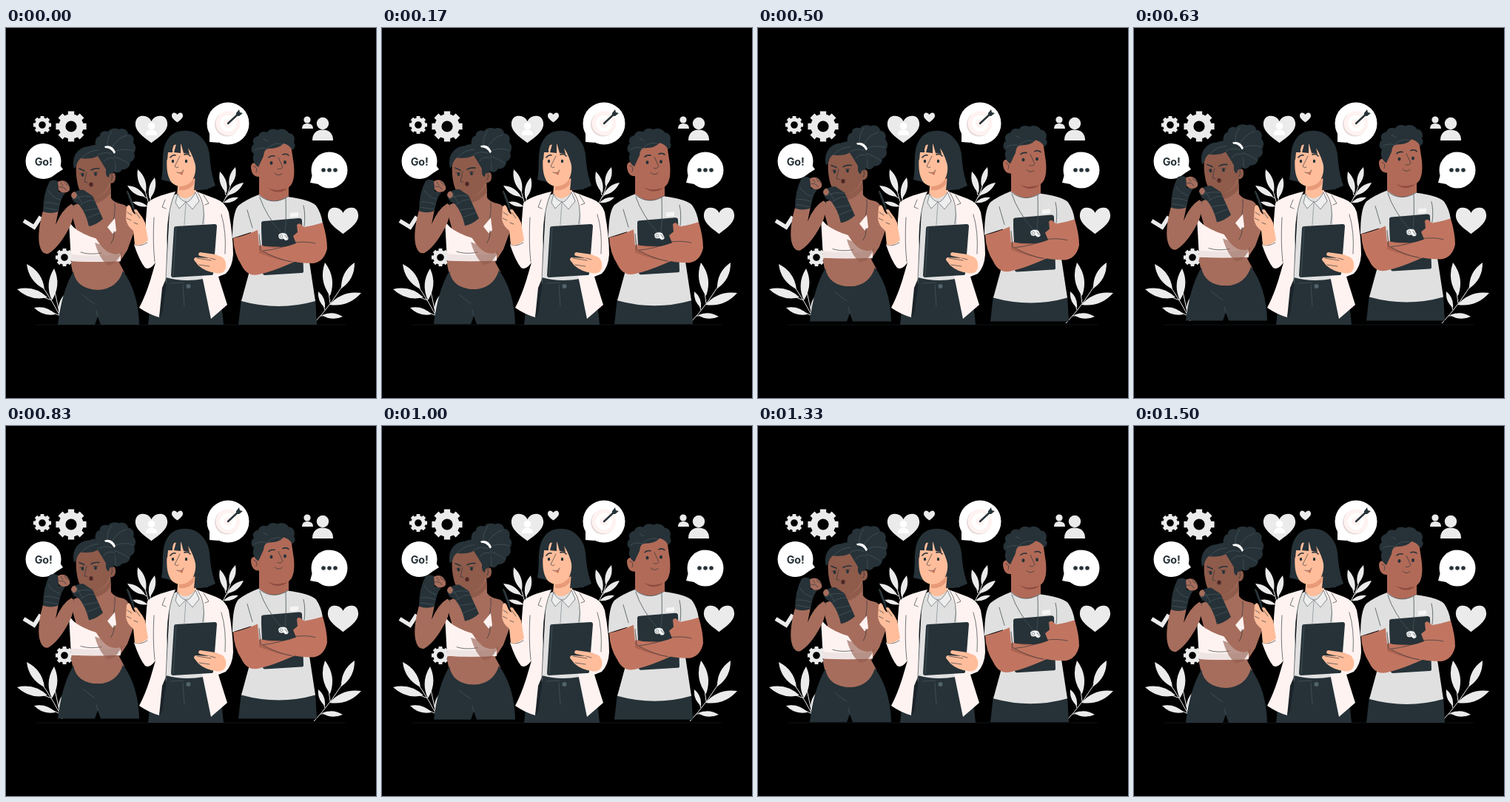
These frames come from a looping animation (500 by 500 pixels, 1540 ms). An HTML page:

```html
<!DOCTYPE html>
<html lang="en">
<head>
<meta charset="utf-8">
<title>Fitness team</title>
<style>
html,body{margin:0;width:100%;height:100%;overflow:hidden;background:#000}
svg{display:block;width:100vw;height:100vh}
.dark{fill:#263238}.pale{fill:#ebebeb}.grey{fill:#e0e0e0}.white{fill:#fff}.coat{fill:#fff3f1}
.tan{fill:#ffbd9b}.brown{fill:#a66d5c}.deep{fill:#8f5b4b}.clay{fill:#c17560}.rust{fill:#b16a57}
.line{fill:none;stroke:#263238;stroke-width:.65;stroke-linecap:round;stroke-linejoin:round}
.thick{stroke-width:1.6}.faint{stroke:#56666e;stroke-width:.5}.pen{stroke-width:2.4}
text{font:700 14.3px Inter,sans-serif;text-anchor:middle}
</style>
</head>
<body>
<svg viewBox="0 0 500 500">
<defs><path id="heart" d="M0 18C-6 13-21 4-21-7C-21-16-15-19-11-18Q-4-18 0-11Q4-18 11-18C15-19 21-16 21-7C21 4 6 13 0 18Z"/></defs>

<g id="gears" class="pale" fill-rule="evenodd"></g>
<path d="M24 260.500L38 269L47 255" fill="none" stroke="#ebebeb" stroke-width="5.500"/>
<g id="plants" class="pale"></g>
<g class="pale">
  <use href="#heart" transform="translate(196.500 137) scale(1.030 1.010)"/>
  <use href="#heart" transform="translate(231.500 121) scale(.36)"/>
  <use href="#heart" transform="translate(455.500 260.500) scale(.98)"/>
  <circle cx="428" cy="129" r="8.200"/><path d="M414 152Q414 138 428 137.500Q442 138 442 152Z"/>
  <circle cx="407" cy="124" r="4.600"/><path d="M400 136Q400 129 407 129Q415 129 415 136Z"/>
</g>
<g class="white"><circle cx="196.500" cy="132.500" r="4.800"/><path d="M188.500 145Q189 137.500 196.500 137.500Q204 137.500 204.500 145Z"/></g>

<g class="white">
  <circle cx="50.500" cy="180" r="24"/><path d="M72 184L77 191L66 198Z"/>
  <circle cx="300" cy="129" r="28.500"/><path d="M275 140L275 154L288 155Z"/>
  <circle cx="437" cy="192" r="24.500"/><path d="M414 198L411 209L422 211Z"/>
</g>
<text class="dark" x="50.800" y="185.500">Go!</text>
<circle cx="298.500" cy="130" r="16.500" fill="#e6d9d8"/><circle cx="300" cy="128.700" r="16.500" class="coat"/>
<circle cx="300" cy="129" r="11" class="white"/><circle cx="300" cy="129" r="6" class="coat"/>
<path class="line pen" d="M300 129L315 115"/>
<path class="dark" d="M311 115L315 110L316 114L320 115L315 119L311 119Z"/>
<g class="dark"><circle cx="429" cy="192" r="2.800"/><circle cx="437" cy="192" r="2.800"/><circle cx="445" cy="192" r="2.800"/></g>
<path class="line" opacity=".6" d="M41 401H459"/>

<g class="bob">
  <path class="dark" d="M122 164C119 155 121 147 127 146C126 140 134 138 138 140C141 135 149 135 152 137C158 134 165 138 165 143C172 144 174 150 172 155C177 160 175 166 173 169C176 176 171 180 168 181C168 189 161 192 157 191C153 198 146 196 143 191Z"/>
  <path class="line faint" d="M141 166Q148 149 163 145M142 169Q158 161 172 166M143 173Q158 177 166 184M146 176Q149 185 148 194M137 160Q136 148 143 140"/>
  <path class="brown" d="M119 215L141 203L142 230Q146 236 156 238Q164 239 167 249L175 270L164 300L153 317L160 330L154 354H95L88 320L94 270L86 242Q100 235 120 231Z"/>
  <path class="deep" d="M118 229Q132 229 141 212L142 222Q132 236 119 237Z"/>
  <path class="deep" d="M99 174Q118 161 136 173L141 197Q147 193 148 200Q149 210 140 210Q134 226 118 230Q105 230 100 220C95 210 94 193 95 184Z"/>
  <path class="dark" d="M92 190C88 172 98 161 112 160C126 154 144 160 146 175C149 186 146 195 144 197Q140 194 139 202Q134 201 135 191C131 184 127 178 124 173Q115 178 101 176Q96 180 95 187Z"/>
  <path class="line faint" d="M124 172Q132 166 143 170M102 176Q112 165 125 165M132 181Q136 174 145 176"/>
  <path class="white" d="M133 160Q144 157 148 168L146 170Q142 162 134 162Z"/>
  <path class="line thick" d="M99 190L106 193M115 192Q120 189 126 190"/>
  <g class="dark"><ellipse cx="103.500" cy="198.500" rx="1.900" ry="2.400"/><ellipse cx="121" cy="197.500" rx="1.900" ry="2.400"/></g>
  <path class="line" d="M109 195L106 208L110 209M100 197L105 196M118 195L124 195M143 198Q145 202 142 206"/>
  <ellipse cx="115" cy="211.500" rx="2.700" ry="3" fill="#4e2825"/>

  <path class="coat" d="M85 261Q89 268 96 273Q112 283 132 287L151 258L155 315Q119 317 88 315Z"/>
  <path d="M88 306Q119 309 155 306L155 315Q120 316 88 315Z" fill="#eee4e3"/>
  <path class="line" d="M92 235Q91 250 87 262M147 237Q148 252 144 264M101 303Q113 307 129 304"/>
  <path class="dark" d="M91 329Q95 353 125 354Q151 352 158 328Q179 357 180 401H128L124 390L120 401H70Q75 357 91 329Z"/>
  <path class="line faint" d="M104 361Q113 369 120 373M124 390L122 382"/>

  <path class="brown" d="M51 244C45 263 43 281 45 292Q48 307 57 305C70 298 83 277 89 262Q95 239 88 238Q76 245 67 266L71 246Z"/>
  <path class="dark" d="M59 207Q64 204 70 207L71 221L80 223Q74 229 71 248Q60 252 50 248Q50 224 59 207Z"/>
  <path class="brown" d="M70 208Q75 205 80 207Q87 211 86 219Q82 224 75 222L71 219Z"/>
  <path class="line" d="M74 209L77 213M79 208L82 212M83 210L85 214M72 215Q79 214 81 219"/>
  <path class="line faint" d="M53 236Q61 235 72 239M57 220Q62 229 73 232M52 243L70 246"/>

  <path class="deep" opacity=".6" d="M120 290Q126 312 138 321L147 318L158 303Z"/>
  <path class="brown" d="M112 265Q122 288 131 297Q141 308 153 305Q169 289 172 267Q168 240 154 238Q145 243 148 260L137 277L130 256Z"/>
  <path class="coat" d="M147 257L149 274L144 278L137 269Z"/>
  <path class="dark" d="M94 221Q104 216 108 221L117 227Q123 240 131 258Q122 266 112 268Q108 250 99 239Q89 235 88 227Z"/>
  <path class="brown" d="M93 221Q88 222 88 227L91 231Q96 230 96 225Z"/>
  <path class="line faint" d="M93 231Q104 225 116 228M101 239Q112 231 119 233M105 247Q116 245 124 244M109 257L127 250M95 224L103 237"/>
  <path class="line" d="M142 291Q147 283 146 275"/>
</g>

<g class="bob">
  <path class="dark" d="M318 366H418L420 401H314Z"/>
  <path class="rust" d="M342 199H382V230Q378 242 362 244Q347 239 342 227Z"/>
  <path d="M354 216Q370 224 382 212L379 218Q366 226 354 216Z" fill="#8d4b3f"/>
  <path class="grey" d="M342 225Q360 241 380 228Q411 232 419 240Q426 250 428 264L403 270L418 369Q369 383 318 369L330 325L331 276L306 284Q306 249 314 240Q324 232 342 225Z"/>
  <path class="line" d="M342 226Q360 241 381 228M402 240Q405 252 403 268M326 246L333 270"/>
  <path class="rust" d="M343 159Q365 146 384 151L389 185C391 207 386 218 373 218Q354 221 343 201Q332 202 331 188Q331 180 341 183Z"/>
  <path class="dark" d="M341 188Q331 181 335 170C329 166 332 158 335 157C331 150 338 146 341 146C343 139 350 140 353 141C357 134 365 137 367 138C374 134 381 139 382 142C390 142 391 151 389 155Q393 160 387 165Q382 157 375 156Q369 163 356 163Q349 162 348 173Z"/>
  <path class="line faint" d="M336 165Q344 160 354 164M353 162Q363 154 372 157M348 150L354 153"/>
  <path class="line thick" d="M355 175Q358 172 363 173M374 171Q379 169 382 172"/>
  <g class="dark"><ellipse cx="358.500" cy="182.500" rx="2" ry="2.400"/><ellipse cx="377" cy="181.500" rx="2" ry="2.400"/></g>
  <path class="line" d="M368 175L374 188Q371 192 367 190M363 196Q367 201 373 197M335 187Q341 188 338 195"/>

  <path class="dark" d="M348 261L396 257Q400 257 400 260L402 329Q402 331 399 331L350 334Q347 334 347 331L345 264Q345 261 348 261Z"/>
  <path d="M384 250L395 249L395 255L384 256Z" fill="#f5f5f5"/>
  <path class="clay" d="M307 284Q322 281 340 273L342 294L387 299L394 314Q361 329 342 333Q326 337 318 320Q308 305 307 284Z"/>
  <path d="M342 295L342 304Q368 315 389 316L397 312L381 296Z" fill="#ad6350"/>
  <path class="clay" d="M342 277L344 293Q364 302 392 291L388 281L394 276L393 266Q397 262 400 267L403 269Q416 267 428 263Q434 283 434 298Q430 316 415 318Q378 318 344 301Z"/>
  <path class="dark" d="M345 268L387 267L388 284Q385 290 379 291L346 288Z"/>
  <path class="line" d="M342 279L344 300Q367 313 386 316M348 301Q370 299 389 290Q406 288 418 291"/>
  <path class="line" d="M343 229Q351 253 372 277M378 230Q379 258 377 277"/>
  <path class="line faint" d="M358 260L372 277M378.500 258L377 277"/>
  <path d="M368 279Q373 275 379 278L382 284Q381 288 377 287L375 285Q369 287 368 282Z" fill="#f5f5f5" stroke="#263238" stroke-width=".6"/>
  <circle cx="372" cy="281.500" r="1.900" fill="none" stroke="#78848a" stroke-width=".8"/><path class="line" d="M377 280L380 284"/>
</g>

<g>
  <path class="dark" d="M213 333H287L294 401H192L195 374Z"/>
  <path class="line faint" d="M239 347L241 376M271 345L279 388M222 345L240 344"/><circle cx="246.500" cy="349" r="3" fill="#53636b"/>
  <path class="dark" d="M210 205C214 188 208 165 219 150C227 136 252 135 263 147C275 158 275 170 276 182Q278 200 283 213Q270 220 253 219L222 208Z"/>
  <path class="tan" d="M233 204H256L257 225Q253 238 243 240Q232 234 231 226Z"/>
  <path d="M234 213Q248 213 255 202L254 211Q246 221 234 219Z" fill="#e89a79"/>
  <path class="tan" d="M219 163Q234 151 248 162L256 183Q258 203 246 211Q234 218 224 209C215 197 217 179 219 163Z"/>
  <path class="dark" d="M216 178Q216 149 239 147Q262 147 268 176L273 218L254 219L257 190Q254 174 246 162L248 170L240 169L236 155L236 169L227 168L231 153Q224 160 225 168L219 168L218 178Z"/>
  <path class="line thick" d="M222 175Q225 171 229 172M241 171Q246 169 249 173"/>
  <g class="dark"><ellipse cx="225.500" cy="180" rx="1.700" ry="2.200"/><ellipse cx="243.500" cy="180" rx="1.700" ry="2.200"/></g>
  <path class="line" d="M235 173L228 187Q230 190 233 188M231 195Q237 198 240 192"/><path d="M234 196Q238 196 240 193L238 199Z" fill="#c76f5c"/>

  <path class="grey" d="M222 228L231 224Q243 237 256 222L272 230L276 260L267 339Q240 344 216 337Z"/>
  <path class="coat" d="M229 221Q198 228 191 237Q189 255 188 279L173 293Q181 316 188 324Q194 328 202 317L195 341Q188 363 180 378Q193 387 207 391L217 341L218 294Q216 254 229 221Z"/>
  <path d="M217 337L216 351L211 386L207 391L211 351Z" fill="#1b2429"/>
  <path class="coat" d="M255 220L284 231Q297 236 301 249Q307 282 307 306Q306 323 297 332L287 336L299 374L277 393L265 335L269 266Q270 242 255 220Z"/>
  <path class="line" d="M229 222Q217 245 218 296L216 340M259 222Q271 239 266 265M215 232L211 242L216 244M267 226L274 237L269 239M200 256Q198 289 201 316M291 252Q298 275 296 305M174 293Q182 296 191 290"/>
  <path d="M232 224L229 236L234 244L243 235L252 245L261 234L256 222Q248 237 243 235Q235 233 232 224Z" fill="#eee" stroke="#263238" stroke-width=".5"/>
  <path class="line faint" d="M243 237L241 266"/>

  <path class="dark" d="M230 268L282 265Q285 265 285 268L280 332Q280 334 277 334L226 337Q223 337 223 334L227 271Q227 268 230 268Z"/>
  <path class="line faint" d="M230 269L226 335"/>
  <path class="tan" d="M262 303Q258 306 262 308L276 311L256 310Q252 312 256 316L260 321Q269 329 283 331Q292 333 296 327Q300 318 293 310L283 306Z"/>
  <path class="line" d="M258 311L277 314M261 320L275 322M276 311L283 313"/>
  <path class="line pen" d="M164 221L174 248"/><path class="line faint" d="M166 223L172 239"/>
  <path class="tan" d="M169 243Q166 236 163 242L162 258Q163 267 172 274L174 293Q182 296 192 287L188 263Q185 256 179 249Q176 243 173 246L175 252Q171 250 169 243Z"/>
  <path class="line" d="M164 249L170 253M175 249L181 257M163 257L169 260M178 265L173 263"/>
</g>
</svg>
<script>
const leaf = (x, y, tx, ty) => {
  const mx = (x + tx) / 2, my = (y + ty) / 2, dx = (ty - y) * .27, dy = (x - tx) * .27;
  return `M${x} ${y}Q${mx + dx} ${my + dy} ${tx} ${ty}Q${mx - dx} ${my - dy} ${x} ${y}Z`;
};
const plant = (stem, leaves) =>
  `<path d="${stem}" fill="none" stroke="#ebebeb"/><path d="${leaves.map(l => leaf(...l)).join('')}"/>`;
plants.innerHTML =
  plant('M76 396Q66 373 44 342M73 389Q65 384 54 382M73 389L64 347M62 368L40 360', [
    [52,353,28,319], [56,364,15,353], [62,368,65,325], [67,387,38,378], [72,387,79,360]]) +
  plant('M416 399Q441 373 463 334M438 372L434 342M431 381L426 366M425 389L446 388', [
    [438,362,431,317], [453,352,471,317], [437,374,480,358], [431,378,422,356], [427,388,455,390]]) +
  plant('M193 252Q196 238 183 208M194 240L197 217M190 230L174 219M193 242L181 236', [
    [189,222,178,191], [194,231,201,202], [188,228,164,213], [191,241,171,235]]) +
  plant('M288 244Q302 225 306 202M297 226L293 206M296 230L312 216', [
    [302,214,310,188], [298,223,289,194], [299,226,321,209], [294,236,314,229]]);

const gear = (x, y, r, hole) => {
  const point = (a, k) => `${x + r * k * Math.cos(a)} ${y + r * k * Math.sin(a)}`;
  let d = '';
  for (let i = 0; i < 8; i++)
    [[-.25, .8], [-.2, 1], [.2, 1], [.25, .8]].forEach(([a, k]) =>
      d += (d ? 'L' : 'M') + point(a + i * Math.PI / 4, k));
  return `<path d="${d}ZM${x - hole} ${y}a${hole} ${hole} 0 1 0 ${2 * hole} 0a${hole} ${hole} 0 1 0 ${-2 * hole} 0Z"/>`;
};
gears.innerHTML = gear(88, 133, 21, 7.600) + gear(49, 131, 12.300, 4.800) + gear(79, 310, 12.300, 4.800);

const movers = document.querySelectorAll('.bob');
const draw = now => {
  const y = -2.850 * (1 - Math.cos((now + 25) / 1540 * 2 * Math.PI));
  movers.forEach(g => g.setAttribute('transform', `translate(0 ${y})`));
  requestAnimationFrame(draw);
};
draw(performance.now());
</script>
</body>
</html>
```
